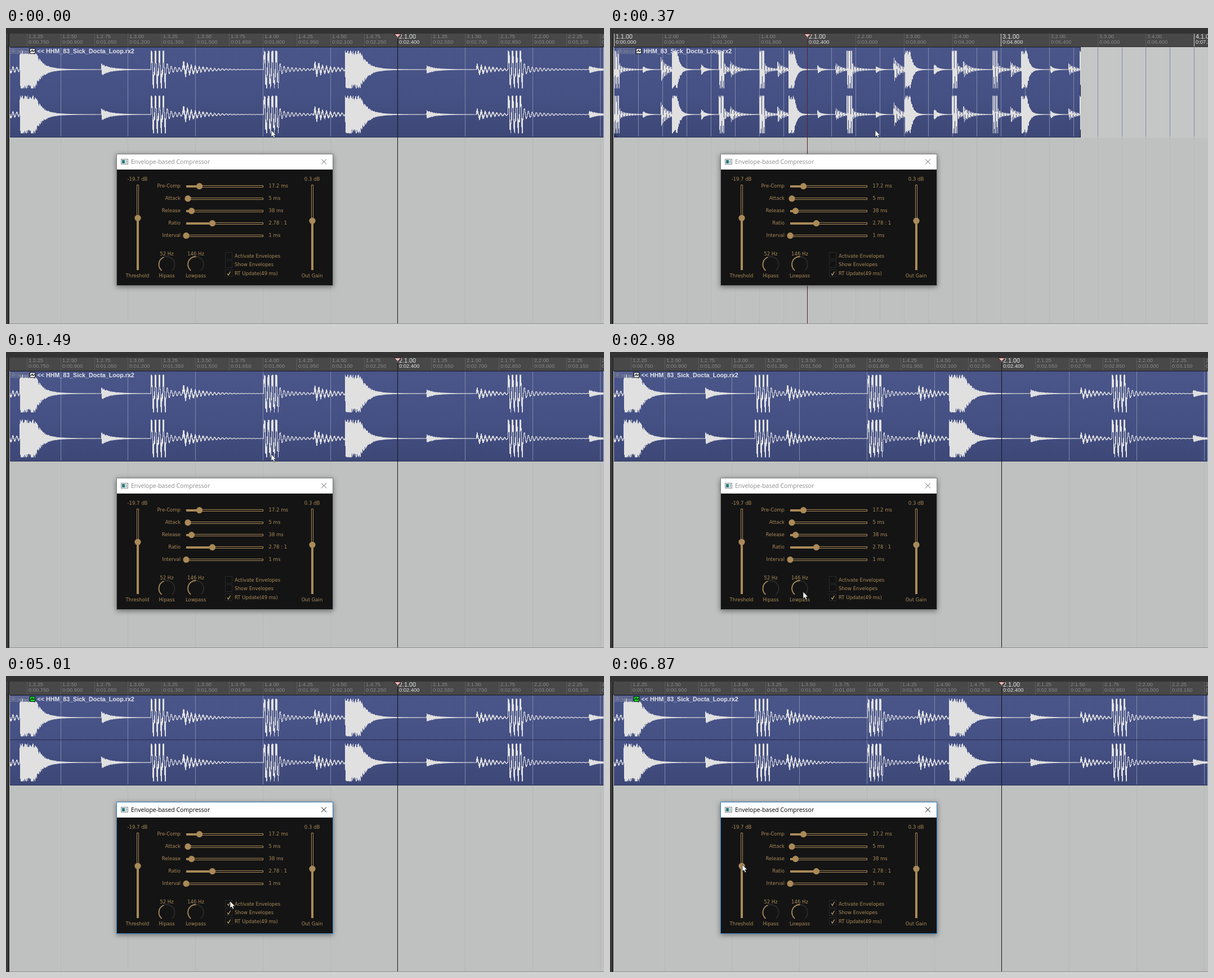
Recreate the animation shown at these times as an HTML page. Size 1062x527 px, loop 7.99 s.

```html
<!DOCTYPE html>
<html lang="en">
<head>
<meta charset="utf-8">
<title>Envelope-based Compressor</title>
<style>
html, body { margin: 0; width: 100%; height: 100%; overflow: hidden; background: #bfc1c0; }
svg { display: block; width: 1062px; height: 527px; }
text { white-space: pre; }
.ruler { font: 9.4px "Liberation Sans", Arial, sans-serif; fill: #898989; }
.bar { fill: #e6e6e6; }
.big { font-size: 10.8px; }
.name { font: bold 10.7px "Liberation Sans", Arial, sans-serif; fill: #e4e4e8; }
.mini { font: 8px "Liberation Sans", Arial, sans-serif; fill: #8d93aa; text-anchor: middle; }
.title { font: 10.5px "Open Sans", sans-serif; }
.panel { font: 8.5px "DejaVu Sans", Verdana, sans-serif; fill: #aa8a58; }
.shadow { filter: drop-shadow(0 2px 5px rgba(0,0,0,.45)); }
</style>
</head>
<body>
<svg id="stage" viewBox="0 0 1062 527" xmlns="http://www.w3.org/2000/svg">
  <defs>
    <linearGradient id="clip" x1="0" y1="0" x2="0" y2="1">
      <stop offset="0" stop-color="#4a5689"/>
      <stop offset=".55" stop-color="#455084"/>
      <stop offset="1" stop-color="#3d4877"/>
    </linearGradient>
  </defs>
</svg>
<script>
const LOOP = 7990, BEAT = 0.6, LEFT = 7, RIGHT = 1061, GOLD = '#aa8a58';
const stage = document.getElementById('stage');

function add(parent, tag, attrs, text) {
  const el = document.createElementNS('http://www.w3.org/2000/svg', tag);
  for (const k in attrs) el.setAttribute(k, attrs[k]);
  if (text !== undefined) el.textContent = text;
  parent.appendChild(el);
  return el;
}
const box = (p, x, y, width, height, fill, extra) => add(p, 'rect', { x, y, width, height, fill, ...extra });
const path = (p, d, stroke, extra) => add(p, 'path', { d, stroke, fill: 'none', ...extra });
const label = (p, x, y, text, cls, anchor = 'start') =>
  add(p, 'text', { x, y, class: cls, 'text-anchor': anchor }, text);
const show = (el, on) => el.setAttribute('display', on ? 'inline' : 'none');

// Drum pattern of one bar: time, kind, level
const BAR = 2.8916;
const HITS = [
  [0, 'kick', 1], [0.361, 'hat', .2], [0.581, 'tom', .75], [0.72, 'snare', 1],
  [1.083, 'hat', .33], [1.303, 'kick', 1], [1.444, 'tom', .5], [1.805, 'kick', 1],
  [2.028, 'tom', .48], [2.167, 'snare', 1], [2.529, 'hat', .22], [2.751, 'tom', .36]
];

function noise(t) {
  const v = Math.sin(Math.floor(t * 1600) * 12.9898) * 43758.5453;
  return (v - Math.floor(v)) * 2 - 1;
}
const tone = (f, t) => Math.sin(2 * Math.PI * f * t);
const fade = (t, tau) => Math.exp(-t / tau);
// Bright carrier that fills the space under an envelope
const fizz = t => tone(410, t) * (.86 + .14 * noise(t));
const VOICES = {
  kick(t) {
    const d = t - .066, low = tone(57, t + .002);
    return d < 0 ? .9 * low + .5 * tone(230, t) : low * (.25 * fade(d, .012) + .18 * fade(d, .11));
  },
  snare(t) {
    const d = t - .07;
    return fizz(t) * (d < 0 ? 1.12 : .86 * fade(d, .031) + .14 * fade(d, .06));
  },
  hat: t => fizz(t) * fade(t, .042),
  tom: t => .6 * tone(58, t) * fade(t, .09) + .45 * fizz(t) * fade(t, .055)
};
function sample(t) {
  const b = t % BAR;
  let hit = HITS[0];
  for (const h of HITS) if (h[0] <= b) hit = h;
  const v = hit[2] * VOICES[hit[1]](b - hit[0]);
  return Math.max(-1, Math.min(1, v));
}
function waveform(t0, pps, end) {
  let d = '';
  for (let x = LEFT; x < end; x++) {
    let lo = 1, hi = -1;
    for (let i = 0; i <= 10; i++) {
      const v = sample(t0 + (x - LEFT + i / 10) / pps);
      lo = Math.min(lo, v);
      hi = Math.max(hi, v);
    }
    for (const mid of [74, 154])
      d += `M${x + .5} ${(mid - .5 - hi * 33).toFixed(1)}V${(mid + .5 - lo * 33).toFixed(1)}`;
  }
  return d;
}

function buildView({ t0, pps, step, line }) {
  const g = add(stage, 'g', {});
  const px = t => Math.round(LEFT + (t - t0) * pps) + .5;
  const end = Math.min(RIGHT, Math.round(px(2 * BAR)));
  const atStart = t0 === 0;
  box(g, 7, 33, RIGHT - 7, 163, '#c5c7c6');

  let grid = '';
  for (let b = Math.ceil(t0 / BEAT * 2) / 2; px(b * BEAT) < RIGHT; b += .5) grid += `M${px(b * BEAT)} `;
  const gridPath = (y0, y1) => grid.replace(/ /g, ` ${y0}V${y1}`);
  path(g, gridPath(33, 526), '#b7b9b8');
  box(g, 7, 34, end - 7, 160, 'url(#clip)');
  path(g, gridPath(35, 193), '#7f89ac');
  path(g, `M7 34.5H${end}M7 194.5H${end}`, '#2d3658');
  if (end < RIGHT) path(g, `M${end - .5} 34V194`, '#20263f');
  path(g, waveform(t0, pps, end), '#e0e0e1');
  if (atStart) add(g, 'path', { d: 'M7 187L14 194H7Z', fill: '#2b3560' });

  for (let b = Math.ceil(t0 / BEAT / step) * step; px(b * BEAT) < RIGHT; b += step) {
    const x = px(b * BEAT), main = b % 4 === 0, in4 = b % 4;
    const frac = String(Math.round(b % 1 * 100)).padStart(2, '0');
    const bar = `${Math.floor(b / 4) + 1}.${Math.floor(in4) + 1}.${frac}`;
    path(g, `M${x} 10V33`, main ? '#cfcfcf' : '#5b5b5b');
    label(g, x + 2.5, main ? 18.5 : 17.5, bar, main ? 'ruler bar big' : 'ruler');
    label(g, x + 2.5, 27.5, '0:' + (b * BEAT).toFixed(3).padStart(6, '0'), main ? 'ruler bar' : 'ruler');
  }

  const ix = atStart ? 12 : 8;
  ['', 'M', 'FX'].forEach((s, i) => {
    const x = ix + i * 11;
    box(g, x + .5, 36.5, 9, 9, '#59628a', { stroke: '#7b829f', opacity: .75 });
    if (s) label(g, x + 5, 44, s, 'mini').style.fontSize = s === 'FX' ? '6px' : '8px';
    else path(g, `M${x + 3} 41V39.5Q${x + 5} 37 ${x + 7} 39.5V41M${x + 2.5} 42.5H${x + 7.5}`, '#9a9fb4');
  });
  const ex = ix + 34;
  const icon = box(g, ex + .5, 36.5, 9, 9, '#f2f2f2', { stroke: '#101010' });
  path(g, `M${ex + 2} 43L${ex + 4.5} 39L${ex + 6} 42L${ex + 8.5} 40`, '#101010', { 'stroke-width': 1.2 });
  label(g, ix + 47.5, 44.5, (atStart ? '' : '<< ') + 'HHM_83_Sick_Docta_Loop.rx2', 'name');

  const envelope = path(g, `M7 113.5H${RIGHT}`, '#252b48');
  const hx = px(2.4);
  path(g, `M${hx} 18V526`, line);
  add(g, 'path', {
    d: `M${hx - 6} 10.5H${hx + 6}L${hx} 17Z`, fill: '#d9c6c0', stroke: '#5c1616'
  });
  return { g, icon, envelope };
}

function buildWindow() {
  const w = add(stage, 'g', {});
  box(w, 196, 224, 385, 235, '#141414', { class: 'shadow' });
  box(w, 197, 225, 383, 27, '#ffffff');
  box(w, 204.5, 233.5, 12, 9, '#f0f3f4', { stroke: '#848c92' });
  box(w, 206, 235, 5, 6, '#277a78');
  box(w, 212, 235, 3, 6, '#b9c4c8');
  const title = label(w, 222, 242, 'Envelope-based Compressor', 'title');
  const close = path(w, 'M560 233.5L569 242.5M569 233.5L560 242.5', '#555');

  [['Pre-Comp', 343.5, '17.2 ms'], ['Attack', 323, '5 ms'], ['Release', 329.5, '38 ms'],
   ['Ratio', 366.5, '2.78 : 1'], ['Interval', 320, '1 ms']].forEach(([name, x, value], i) => {
    const y = 282 + i * 22;
    label(w, 310, y + 2.2, name, 'panel', 'end');
    label(w, 466.5, y + 2.2, value, 'panel');
    box(w, 320.5, y - 1.5, 136, 3, 'none', { stroke: GOLD });
    box(w, 320, y - 2, x - 320, 4, GOLD);
    add(w, 'circle', { cx: x, cy: y - .3, r: 5.6, fill: GOLD });
  });
  [[234, 338.3, '-19.7 dB', 'Threshold'], [544, 343.3, '0.3 dB', 'Out Gain']].forEach(([x, y, value, name]) => {
    label(w, x - .5, 272, value, 'panel', 'middle');
    label(w, x - .5, 443.5, name, 'panel', 'middle');
    box(w, x - 1.5, 279.5, 3, 151, 'none', { stroke: GOLD });
    box(w, x - 2, y, 4, 431 - y, GOLD);
    add(w, 'circle', { cx: x, cy: y, r: 5.6, fill: GOLD });
  });

  const arc = (cx, from, to) => {
    const at = a => `${cx + 14 * Math.sin(a * Math.PI / 180)} ${421 - 14 * Math.cos(a * Math.PI / 180)}`;
    return `M${at(from)}A14 14 0 ${to - from > 180 ? 1 : 0} 1 ${at(to)}`;
  };
  [[285.5, -22, '52 Hz', 'Hipass'], [337, 2, '146 Hz', 'Lowpass']].forEach(([x, turn, value, name]) => {
    path(w, arc(x, -140, 140), '#2b2b2b', { 'stroke-width': 1.8 });
    path(w, arc(x, -140, turn), GOLD, { 'stroke-width': 1.8 });
    label(w, x, 405, value, 'panel', 'middle');
    label(w, x, 443.5, name, 'panel', 'middle');
  });

  const checks = ['Activate Envelopes', 'Show Envelopes', 'RT Update(49 ms)'].map((s, i) => {
    const y = 405.5 + i * 15.8;
    box(w, 389.5, Math.round(y) - 6.5, 12, 12, '#121212', { stroke: '#292929' });
    label(w, 406, y + 3, s, 'panel');
    return path(w, `M393 ${y}L395 ${y + 3}L398.5 ${y - 3.5}`, '#c6a671', { 'stroke-width': 1.2 });
  });
  const border = box(w, 196.5, 224.5, 384, 234, 'none', {});
  return { title, close, border, checks };
}

box(stage, 0, 0, 1062, 527, '#bfc1c0');
box(stage, 0, 0, 1062, 10, '#333333');
box(stage, 0, 10, 1062, 23, '#484848');
const VIEWS = {
  near: buildView({ t0: 2.4 - 688.45 / 399.2, pps: 399.2, step: .25, line: '#141414' }),
  mid: buildView({ t0: 0, pps: 283.75, step: .5, line: '#5e2028' }),
  far: buildView({ t0: 0, pps: 143.1, step: 1, line: '#5e2028' })
};
box(stage, 0, 10, 6, 517, '#3a3a3a');
box(stage, 4, 10, 2, 517, '#272727');
path(stage, 'M0 33.5H1062', '#303030');
path(stage, 'M7 526.5H1062', '#8d8f8e');
const win = buildWindow();
const pointer = add(stage, 'path', {
  d: 'M0 0V12L2.8 9.6L4.8 14L6.8 13.1L4.9 8.8H8.6Z', fill: '#fff', stroke: '#222', 'stroke-width': .7
});

const ZOOM = [[0, 'near'], [180, 'mid'], [370, 'far'], [1120, 'mid'], [1490, 'near']];
const POINTER = [
  [0, 471, 182], [2240, 393, 346], [2420, 320, 439], [2610, 343, 427], [3530, 343, 427],
  [3720, 406, 439], [3900, 403, 426], [4090, 402, 407], [4270, 400, 407], [4460, 398, 401],
  [6320, 248, 323], [6500, 241, 335], [6690, 237, 336], [6870, 235, 336]
];
const stepAt = (table, t) => table.reduce((last, s) => s[0] <= t ? s : last);

function draw(t) {
  const zoom = stepAt(ZOOM, t)[1], active = t >= 4830;
  for (const k in VIEWS) {
    show(VIEWS[k].g, k === zoom);
    show(VIEWS[k].envelope, active);
    VIEWS[k].icon.setAttribute('fill', active ? '#12e01c' : '#f2f2f2');
  }
  win.title.setAttribute('fill', active ? '#000' : '#8c8c8c');
  win.close.setAttribute('stroke', active ? '#000' : '#666');
  win.border.setAttribute('stroke', active ? '#2f80c4' : '#7d7f7e');
  show(win.checks[0], t >= 5010);
  show(win.checks[1], active);
  const [, x, y] = stepAt(POINTER, t);
  pointer.setAttribute('transform', `translate(${x} ${y})`);
}

const start = performance.now();
function tick() {
  draw((performance.now() - start) % LOOP);
  requestAnimationFrame(tick);
}
tick();
</script>
</body>
</html>
```
